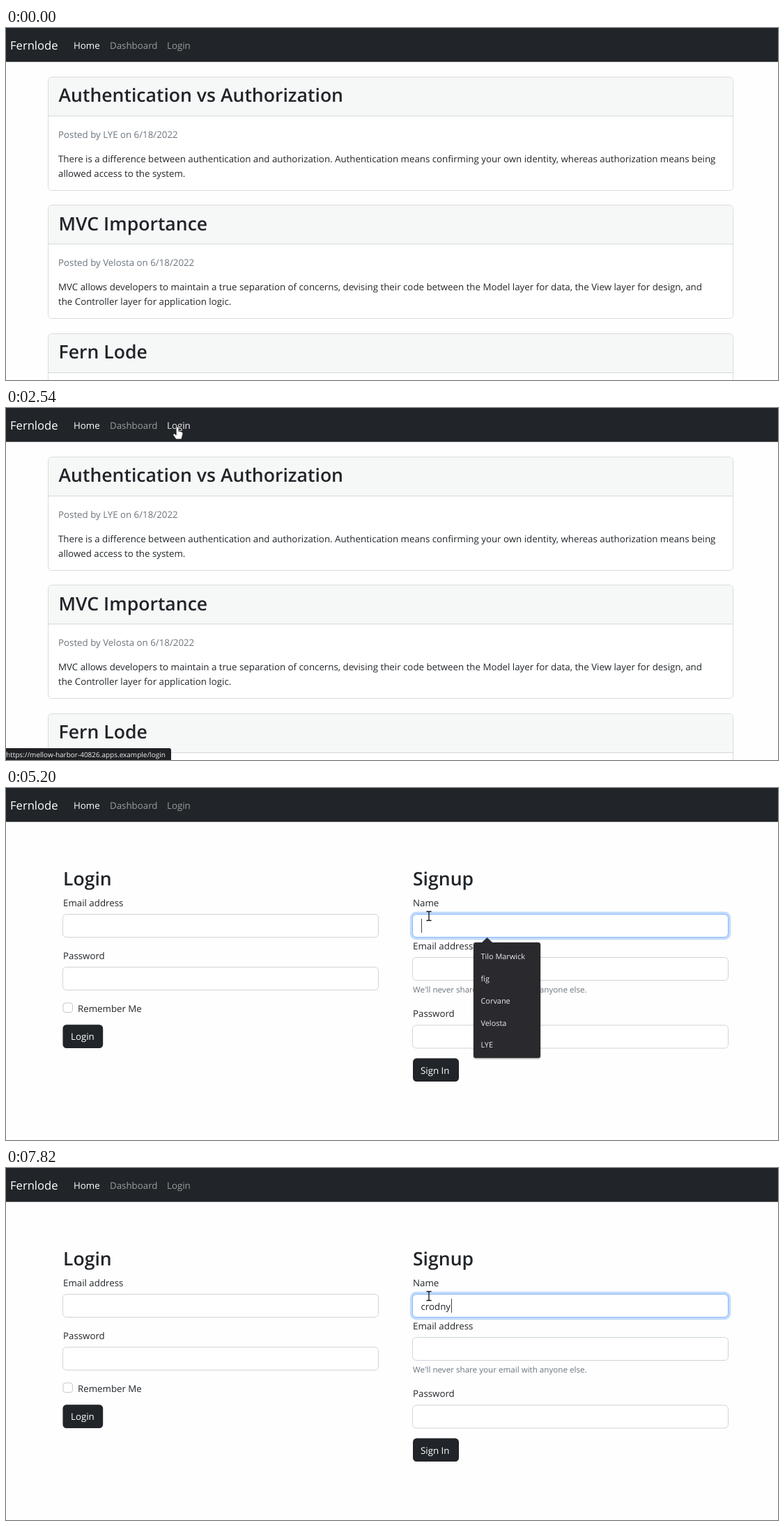
Animation of 1108x506 px, one loop 8000 ms. Source, as an HTML page:

```html
<!DOCTYPE html>
<html lang="en">
<head>
<meta charset="utf-8">
<title>Blog sign-up</title>
<style>
html, body { margin: 0; width: 100%; height: 100%; overflow: hidden; background: #fefefe; }
svg { display: block; width: 1108px; height: 506px; }
text { font: 13.3px "Open Sans", "Noto Sans", sans-serif; fill: #212529; text-rendering: geometricPrecision; white-space: pre; }
.title { font-size: 26.6px; font-weight: 600; }
.muted { fill: #6c757d; }
.small { font-size: 11.64px; }
.light { fill: #fff; }
.brand { font-size: 16.63px; }
.link { fill: #9b9d9e; }
.status { font-size: 10px; fill: #f1f2f3; }
#popup text { font-size: 10.9px; fill: #e8eaed; }
.dark { fill: #212529; }
.input { fill: #fff; stroke: #ced4da; }

.anim { animation: 8s step-end infinite; }
#home { animation-name: home; }
#forms { animation-name: forms; }
#hover { animation-name: hover; fill: #c8c9ca; }
#postUrl { animation-name: postUrl; animation-timing-function: linear; }
#loginUrl { animation-name: loginUrl; animation-timing-function: linear; }
#focus { animation-name: focus; animation-timing-function: linear; }
#popup { animation-name: popup; animation-timing-function: linear; }
#caret { animation-name: caret; }
#pointer { animation-name: travel; }
#arrow { animation-name: arrow; }
#hand { animation-name: hand; }
#beam { animation-name: beam; }
#click { animation-name: click; }

@keyframes home { 0% { opacity: 1 } 34.125%, 100% { opacity: 0 } }
@keyframes forms { 0% { opacity: 0 } 34.125%, 100% { opacity: 1 } }
@keyframes hover { 0% { opacity: 0 } 16.6% { opacity: 1 } 34.125%, 100% { opacity: 0 } }
@keyframes postUrl { 0%, 3.5% { opacity: 0 } 5%, 8.6% { opacity: 1 } 9% { opacity: .89 } 10.7%, 100% { opacity: 0 } }
@keyframes loginUrl { 0%, 17.4% { opacity: 0 } 18.25%, 37.4% { opacity: 1 } 39.8%, 100% { opacity: 0 } }
@keyframes focus { 0%, 50% { opacity: 0 } 51.8%, 100% { opacity: 1 } }
@keyframes popup { 0%, 51.75% { opacity: 0 } 54.2%, 75% { opacity: 1 } 76.75%, 100% { opacity: 0 } }
@keyframes caret {
  0% { opacity: 0 } 52.5% { opacity: 1 } 59.25% { opacity: 0 }
  65% { opacity: 1 } 71.75% { opacity: 0 } 74.25%, 100% { opacity: 1 }
}
@keyframes arrow {
  0% { opacity: 0 } 1.5% { opacity: 1 } 16.6% { opacity: 0 }
  37.4% { opacity: 1 } 47.5%, 100% { opacity: 0 }
}
@keyframes hand { 0% { opacity: 0 } 16.6% { opacity: 1 } 37.4%, 100% { opacity: 0 } }
@keyframes beam { 0% { opacity: 0 } 47.5%, 100% { opacity: 1 } }
@keyframes click {
  0% { opacity: 0 } 29.25% { opacity: 1 } 31.75% { opacity: 0 }
  50% { opacity: 1 } 51.75%, 100% { opacity: 0 }
}
@keyframes travel {
  0% { transform: translate(1083px, 489px) }
  1.5% { transform: translate(1083px, 489px); animation-timing-function: steps(9) }
  9% { transform: translate(742px, 316px); animation-timing-function: steps(2) }
  10.75% { transform: translate(308px, 63px) }
  11.625% { transform: translate(295px, 52px) }
  15% { transform: translate(283px, 44px); animation-timing-function: steps(4) }
  18.25% { transform: translate(246px, 27px) }
  36.625% { transform: translate(248px, 34px); animation-timing-function: steps(4) }
  39.875% { transform: translate(279px, 79px); animation-timing-function: steps(7) }
  45.75% { transform: translate(571px, 171px) }
  46.75% { transform: translate(580px, 173px); animation-timing-function: steps(4) }
  50%, 100% { transform: translate(607px, 184px) }
}
</style>
</head>
<body>
<svg viewBox="0 0 1108 506">
  <defs>
    <g id="card">
      <rect x="60.5" y="70.5" width="983" height="163" rx="5" fill="#fff"/>
      <path d="M61 126V76q0-5 5-5H1038q5 0 5 5V126z" fill="#f6f8f8"/>
      <path d="M61 126.5H1043" stroke="#d6d8d8"/>
      <rect x="60.5" y="70.5" width="983" height="163" rx="5" fill="none" stroke="#dadbdb"/>
    </g>
    <rect id="input" width="453" height="33" rx="5.3"/>
    <filter id="shadow" x="-20%" y="-20%" width="140%" height="140%">
      <feDropShadow dx="0" dy="1" stdDeviation="1.2" flood-opacity=".45"/>
    </filter>
  </defs>

  <rect width="1108" height="506" fill="#fefefe"/>
  <rect class="dark" width="1108" height="48.7"/>
  <text class="brand light" x="6" y="31.3">Fernlode</text>
  <text class="light" x="97" y="30.1">Home</text>
  <text class="link" x="149" y="30.1">Dashboard</text>
  <text class="link" x="231" y="30.1">Login</text>
  <text class="anim" id="hover" x="231" y="30.1">Login</text>

  <g class="anim" id="home">
    <g>
      <use href="#card"/>
      <text class="title" x="75.5" y="106.4">Authentication vs Authorization</text>
      <text class="muted" x="75" y="157.5">Posted by LYE on 6/18/2022</text>
      <text x="75" y="192.6">There is a difference between authentication and authorization. Authentication means confirming your own identity, whereas authorization means being</text>
      <text x="75" y="213.7">allowed access to the system.</text>
    </g>
    <g transform="translate(0 184)">
      <use href="#card"/>
      <text class="title" x="75.5" y="106.8">MVC Importance</text>
      <text class="muted" x="75" y="158">Posted by Velosta on 6/18/2022</text>
      <text x="75" y="193.1">MVC allows developers to maintain a true separation of concerns, devising their code between the Model layer for data, the View layer for design, and</text>
      <text x="75" y="214.2">the Controller layer for application logic.</text>
    </g>
    <g transform="translate(0 369)">
      <use href="#card"/>
      <text class="title" x="75.5" y="106.4">Fern Lode</text>
    </g>
  </g>

  <g class="anim" id="forms">
    <text class="title" x="82" y="140.2">Login</text>
    <text x="82" y="169.7">Email address</text>
    <use class="input" href="#input" x="81.5" y="181.5"/>
    <text x="82" y="245.7">Password</text>
    <use class="input" href="#input" x="81.5" y="257.5"/>
    <rect x="82" y="309" width="13.5" height="13.5" rx="3.3" fill="#fff" stroke="#c6c8ca"/>
    <text x="103" y="321.5">Remember Me</text>
    <rect class="dark" x="81.5" y="340.3" width="57.7" height="33.7" rx="5.3"/>
    <text class="light" x="93" y="362.3">Login</text>

    <text class="title" x="584" y="140.2">Signup</text>
    <text x="584" y="169.7">Name</text>
    <use class="input" href="#input" x="583.5" y="181.5"/>
    <text x="584" y="231.6">Email address</text>
    <use class="input" href="#input" x="583.5" y="243.5"/>
    <text class="small muted" x="584" y="294.3">We'll never share your email with anyone else.</text>
    <text x="584" y="328.9">Password</text>
    <use class="input" href="#input" x="583.5" y="341"/>
    <rect class="dark" x="584" y="388.6" width="66" height="33.5" rx="5.3"/>
    <text class="light" x="595" y="411.2">Sign In</text>

    <g class="anim" id="focus" fill="none">
      <rect x="581.6" y="179.6" width="456.8" height="36.8" rx="7" stroke="#c2dbfe" stroke-width="3.6"/>
      <use href="#input" x="583.5" y="181.5" stroke="#86b7fe"/>
    </g>
    <text id="typed" x="595.5" y="203.7"></text>
    <rect class="anim" id="caret" x="596" y="188" width="1" height="20" fill="#444"/>

    <g class="anim" id="popup">
      <path d="M674 222H683L690.5 215L698 222H764q3 0 3 3V385q0 3-3 3H674q-3 0-3-3V225q0-3 3-3z" fill="#292a2d" filter="url(#shadow)"/>
      <text x="681.5" y="246.2">Tilo Marwick</text>
      <text x="681.5" y="278">fig</text>
      <text x="681.5" y="309.8">Corvane</text>
      <text x="681.5" y="341.5">Velosta</text>
      <text x="681.5" y="373.2">LYE</text>
    </g>
  </g>

  <g class="anim" id="postUrl">
    <rect x="-5" y="489" width="252" height="22" rx="3" fill="#202124"/>
    <text class="status" x="0" y="502.3">https://mellow-harbor-40826.apps.example/posts/3</text>
  </g>
  <g class="anim" id="loginUrl">
    <rect x="-5" y="489" width="242" height="22" rx="3" fill="#202124"/>
    <text class="status" x="0" y="502.3">https://mellow-harbor-40826.apps.example/login</text>
  </g>

  <g class="anim" id="pointer">
    <circle class="anim" id="click" r="11" fill="#ff0" fill-opacity=".47"/>
    <path class="anim" id="arrow" d="M.5.5V14L3.6 11.1L5.8 16L7.8 15.1L5.7 10.3H9.8z" fill="#fff" stroke="#333" stroke-width=".8"/>
    <path class="anim" id="hand" d="M-1.7 1.6Q0-.9 1.7 1.6V6.4L6 7.3Q8 7.8 7.8 10L6.6 14.5L5.6 17.8H-1.8L-6 12Q-6.6 9.8-4.2 10L-1.7 12z" fill="#fff" stroke="#111" stroke-width=".5"/>
    <path class="anim" id="beam" d="M-3.5-6.5H-1Q0-6.5 0-5.5Q0-6.5 1-6.5H3.5M0-6V6M-3.5 6.5H-1Q0 6.5 0 5.5Q0 6.5 1 6.5H3.5" fill="none" stroke="#111" stroke-width="1.3"/>
  </g>
</svg>
<script>
const LOOP = 8000;
const NAME = "crodny";
const KEY_TIMES = [5940, 6270, 6600, 6930, 7260, 7820];
const typed = document.getElementById("typed");
const caret = document.getElementById("caret");
let start;

function tick(now) {
  start ??= now;
  const time = (now - start) % LOOP;
  const text = NAME.slice(0, KEY_TIMES.filter(key => key <= time).length);
  if (typed.textContent !== text) {
    typed.textContent = text;
    caret.setAttribute("x", Math.round(596 + (text ? typed.getComputedTextLength() : 0)));
  }
  requestAnimationFrame(tick);
}
requestAnimationFrame(tick);
</script>
</body>
</html>
```
